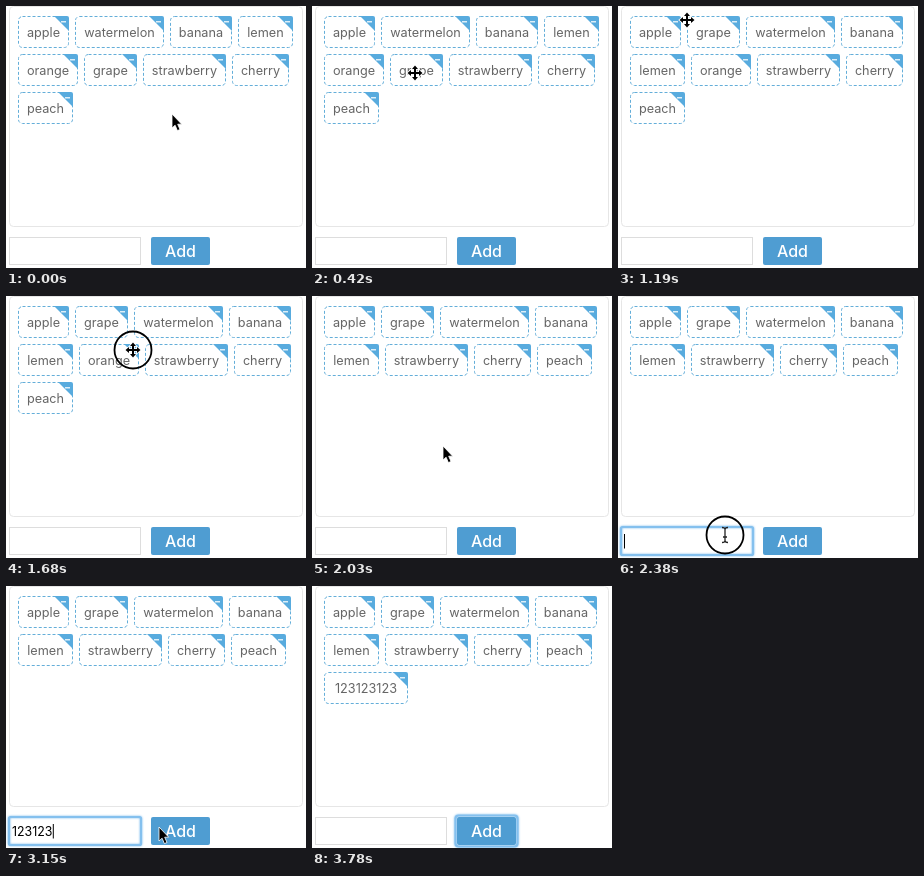
These frames come from a looping animation (300 px wide and 262 px high, 3920 ms). An HTML page:

```html
<!DOCTYPE html>
<html>
<head>
<meta charset="utf-8">
<style>
  html, body { margin: 0; width: 300px; height: 262px; overflow: hidden; background: #fff; }
  svg { display: block; font: 12.7px Inter, Roboto, sans-serif; }
  .tag text { fill: #666; text-anchor: middle; }
  .tag rect { fill: #fff; stroke: #64aed9; stroke-dasharray: 3 2; }
  .tag path { fill: #58abde; }
  .field { fill: #fff; stroke: #ddd; }
  .glow { fill: none; stroke: #84c0ee; stroke-width: 2.2; filter: drop-shadow(0 0 1.2px #84c0ee); }
</style>
</head>
<body>
<svg id="stage" width="300" height="262" viewBox="0 0 300 262"></svg>
<script>
const STEP = 70, LOOP = 3920;
const DRAG = 560, DROP = 980, REMOVE = 1750, FOCUS = 2380, TYPE = 2800, BLUR = 3430, ADD = 3500;
const PHRASE = '123123123';
const widths = { apple: 51, watermelon: 89, banana: 62, lemen: 55, orange: 60, grape: 53,
                 strawberry: 83, cherry: 57, peach: 55, [PHRASE]: 84 };

// time, x, y of the pointer
const route = [[0, 166, 108], [70, 166, 108], [420, 103, 67], [560, 103, 67], [770, 85, 19],
  [910, 72, 15], [1190, 69, 14], [1540, 127, 54], [1750, 127, 54], [2030, 131, 150],
  [2310, 107, 239], [2800, 107, 239], [3150, 153, 241], [3290, 165, 244], [3430, 165, 244],
  [3710, 150, 290], [LOOP, 150, 290]];
const presses = [[490, DROP], [1610, REMOVE], [FOCUS, 2520], [3360, ADD]];

const cursors = {
  arrow: '<path d="M0 0V14L3.1 11.2 5.4 16.6 8 15.5 5.7 10.2H9.7Z" stroke="#fff" stroke-width=".8"/>',
  move: `<path d="M0-7.5L3-4H1V-1H4V-3L7.5 0 4 3V1H1V4H3L0 7.5-3 4H-1V1H-4V3L-7.5 0-4-3V-1H-1V-4H-3Z"
    stroke="#fff" stroke-width="1.6" paint-order="stroke"/>`,
  beam: '<path d="M-3-7.5Q0-7.5 0-5.5 0-7.5 3-7.5M0-5.5V5.5M-3 7.5Q0 7.5 0 5.5 0 7.5 3 7.5M-2 2H2" fill="none" stroke="#222" stroke-width="1.3"/>'
};

function pointerAt(t) {
  const i = route.findIndex(p => p[0] > t);
  const [t0, x0, y0] = route[i - 1], [t1, x1, y1] = route[i];
  const u = (t - t0) / (t1 - t0), e = u * u * (3 - 2 * u);
  return { x: x0 + (x1 - x0) * e, y: y0 + (y1 - y0) * e };
}

function layout(t) {
  let names = t < DROP
    ? ['apple', 'watermelon', 'banana', 'lemen', 'orange', 'grape', 'strawberry', 'cherry', 'peach']
    : ['apple', 'grape', 'watermelon', 'banana', 'lemen', 'orange', 'strawberry', 'cherry', 'peach'];
  if (t >= REMOVE) names = names.filter(n => n !== 'orange');
  if (t >= ADD) names.push(PHRASE);
  let x = 12, y = 10;
  return names.map(name => {
    const w = widths[name];
    if (x + w > 290) { x = 12; y += 38; }
    const box = { name, x, y, w };
    x += w + 6;
    return box;
  });
}

const tag = ({ name, x, y, w }, opacity = 1) => `
  <g class="tag" transform="translate(${x} ${y})" opacity="${opacity}">
    <rect x=".5" y=".5" width="${w - 1}" height="31" rx="4"/>
    <path d="M${w - 15} 0H${w - 2}Q${w} 0 ${w} 2V15Z"/>
    <path d="M${w - 8} 5.8h5" stroke="#fff" stroke-width="1.2"/>
    <text x="${w / 2}" y="21">${name}</text>
  </g>`;

const inside = (p, x, y, w, h) => p.x >= x && p.x <= x + w && p.y >= y && p.y <= y + h;

function form(t) {
  const focused = t >= FOCUS && t < BLUR;
  const count = t < TYPE || t >= ADD ? 0 : Math.min(9, Math.floor((t - TYPE) / STEP) + 1);
  const caret = 6.5 + count * 6.8;
  return `
    <rect class="field" x="3.5" y="231.5" width="131" height="27"/>
    ${focused ? `<rect class="glow" x="3" y="231" width="132" height="28" rx="1.5"/>
      <path d="M${caret} 238V252.5" stroke="#000"/>` : ''}
    <text x="6" y="250" font-size="12.4">${PHRASE.slice(0, count)}</text>
    ${t >= BLUR ? '<rect class="glow" x="143.5" y="229.5" width="62" height="31" rx="3"/>' : ''}
    <rect x="145" y="231" width="59" height="28" rx="2" fill="#4f9dd2"/>
    <text x="174.5" y="251" font-size="16" font-weight="500" fill="#fff" text-anchor="middle">Add</text>`;
}

function pointer(t, p, tags) {
  const dragging = t >= DRAG && t < DROP;
  const pressed = presses.some(([from, to]) => t >= from && t < to);
  const kind = dragging || tags.some(b => inside(p, b.x, b.y, b.w, 32)) ? 'move'
    : inside(p, 3, 231, 132, 28) ? 'beam' : 'arrow';
  return `<g transform="translate(${p.x} ${p.y})">
    ${pressed ? '<circle r="18.5" fill="none" stroke="#000" stroke-width="1.8"/>' : ''}
    ${cursors[kind]}</g>`;
}

function render(t) {
  const p = pointerAt(t), tags = layout(t);
  const dragging = t >= DRAG && t < DROP;
  const ghost = { name: 'grape', x: p.x - 25, y: p.y - 19, w: widths.grape };
  stage.innerHTML = `
    <rect class="field" x="3.5" y=".5" width="293" height="220" rx="4" style="stroke:#e6e6e6"/>
    ${tags.filter(b => !dragging || b.name !== 'grape').map(b => tag(b)).join('')}
    ${form(t)}
    ${dragging ? tag(ghost, 0.75) : ''}
    ${pointer(t, p, tags)}`;
}

const stage = document.getElementById('stage');
let shown = -1;
function tick() {
  const step = Math.floor(performance.now() % LOOP / STEP);
  if (step !== shown) render((shown = step) * STEP);
  requestAnimationFrame(tick);
}
tick();
</script>
</body>
</html>
```
